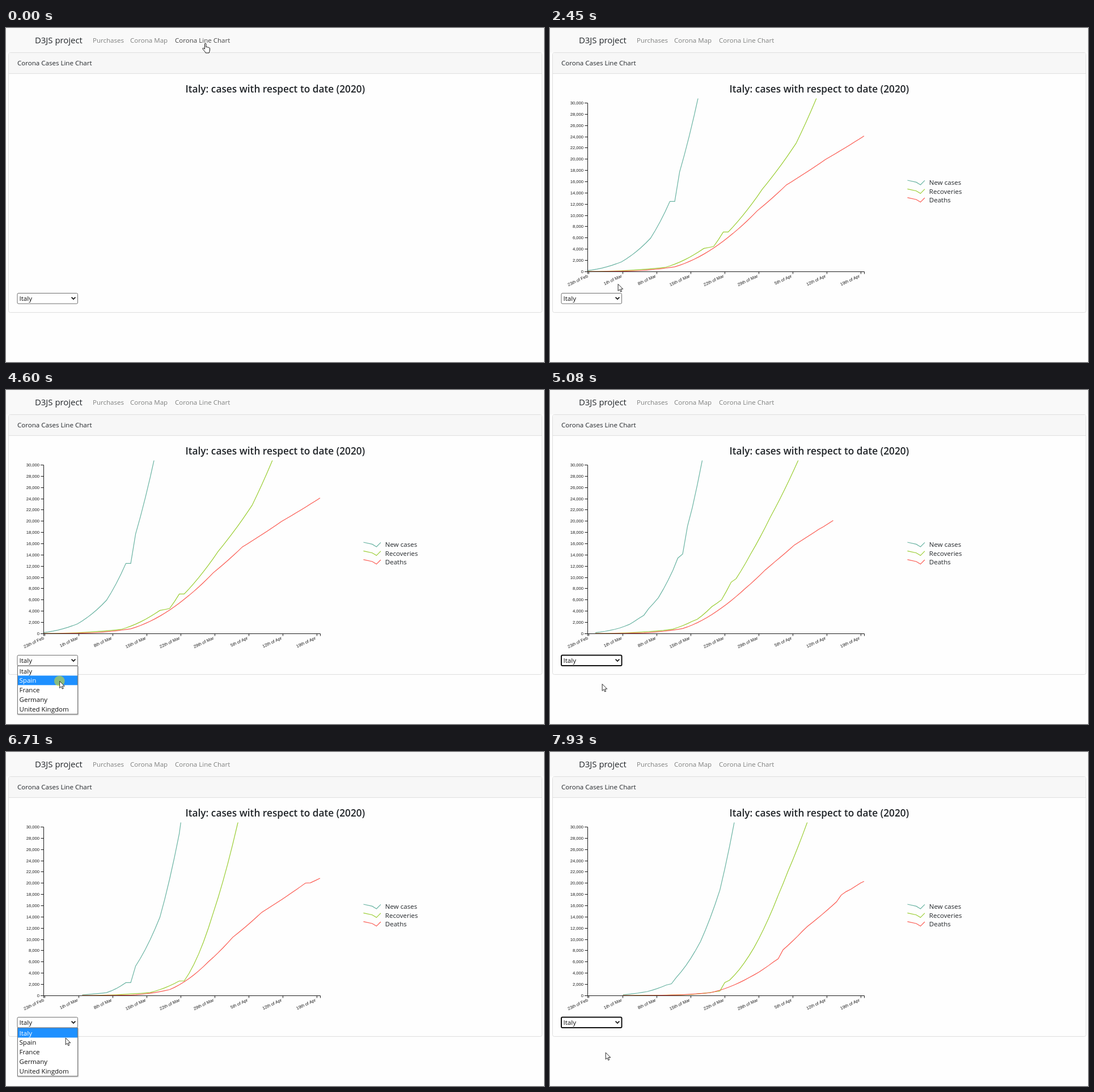
An HTML page that plays this animation: 949 px wide and 590 px high, repeating every 8 s.

```html
<!DOCTYPE html>
<html lang="en">
<head>
<meta charset="utf-8">
<title>Corona Cases Line Chart</title>
<style>
  html, body { margin: 0; width: 100%; height: 100%; overflow: hidden; background: #fefefe; }
  svg { display: block; width: 949px; height: 590px; }
  text { font: 11.55px "Open Sans", "Noto Sans", sans-serif; fill: #212529; }
  .brand { font-size: 14.9px; }
  .link { fill: #7f807f; }
  .title { font-size: 17.3px; font-weight: 600; text-anchor: middle; }
  .tick { font: 7.64px "Liberation Sans", Arial, sans-serif; text-anchor: end; fill: #1c1c1c; }
  .axis { fill: none; stroke: #1c1c1c; }
  .line { fill: none; stroke-width: 1.2; }
  .option { fill: #111; }
</style>
</head>
<body>
<svg viewBox="0 0 949 590">
  <defs>
    <clipPath id="plot"><rect x="60" y="124.4" width="494.6" height="320"/></clipPath>
    <filter id="shadow" x="-10%" y="-10%" width="125%" height="125%">
      <feDropShadow dx=".5" dy="1" stdDeviation="1.1" flood-opacity=".35"/>
    </filter>
  </defs>

  <rect width="949" height="43" fill="#f9f9f9"/>
  <rect x="4.5" y="43.5" width="941" height="459" rx="3" fill="#fefefe" stroke="#dfdfdf"/>
  <path d="M5 80V46q0-2 2-2H943q2 0 2 2V80Z" fill="#f7f7f7"/>
  <path d="M5 80.5H945" stroke="#dfdfdf"/>
  <text class="brand" x="51" y="27.3">D3JS project</text>
  <text class="link" x="153" y="26">Purchases</text>
  <text class="link" x="219" y="26">Corona Map</text>
  <text class="link" id="active" x="298" y="26">Corona Line Chart</text>
  <text x="20" y="66.3">Corona Cases Line Chart</text>
  <text class="title" x="474.8" y="114">Italy: cases with respect to date (2020)</text>

  <g id="chart">
    <g id="lines" clip-path="url(#plot)"></g>
    <g id="axes"></g>
    <g id="legend"></g>
  </g>

  <rect id="select" x="20" y="468.5" width="106.5" height="18.5" rx="2" fill="#fff"/>
  <text class="option" x="23.5" y="482.3">Italy</text>
  <path d="M115.6 475.6l3.4 3.4 3.4-3.4" fill="none" stroke="#111" stroke-width="1.7"/>
  <g id="menu">
    <rect x="20.5" y="487.5" width="106" height="85" fill="#fff" stroke="#767676" filter="url(#shadow)"/>
    <rect id="highlight" x="21" width="105" height="16.8" fill="#1e90ff"/>
  </g>

  <circle id="click" r="9.3" fill="#f6ea00" fill-opacity=".5"/>
  <path id="hand" transform="translate(346.5 27)" fill="#fff" stroke="#111" stroke-linejoin="round"
    d="M4 1.2c0-1.6 2.4-1.6 2.4 0V7c.3-1 2.2-.9 2.4.3 .5-.8 2-.6 2.2.6 .6-.6 2-.2 2 1.1V12c0 2-1.2 3-1.4 5H5.6C5 14.6 2 12.5.6 10c-.7-1.5 1-2.2 2-1.1L4 10.3Z"/>
  <path id="arrow" fill="#fff" stroke="#111" stroke-width=".9" stroke-linejoin="round"
    d="M.4.4V12.4L3.2 9.8 5 14 6.9 13.2 5.1 9.1H9Z"/>
</svg>

<script>
const LOOP = 8000;
const LAST_DAY = 57;
const DAY = 8.563;
const COLORS = ['#69b3a2', '#9acd32', '#fb5b52'];
const $ = id => document.getElementById(id);
const clamp = (v, lo, hi) => Math.min(hi, Math.max(lo, v));
const mix = (a, b, k) => a + (b - a) * k;
const scaleX = day => 65.9 + day * DAY;
const scaleY = thousands => 430.1 - thousands * 9.93;

function add(parent, tag, attrs, text) {
  const el = document.createElementNS('http://www.w3.org/2000/svg', tag);
  for (const name in attrs) el.setAttribute(name, attrs[name]);
  if (text) el.textContent = text;
  return parent.appendChild(el);
}

// Quadratic growth between key points [day, thousands]; the last trend goes on.
function growth(keys, day) {
  let i = keys.findIndex(key => key[0] > day);
  if (i < 0) i = keys.length - 1;
  const [d0, v0] = keys[i - 1], [d1, v1] = keys[i];
  return mix(Math.sqrt(v0), Math.sqrt(v1), (day - d0) / (d1 - d0)) ** 2;
}

// One value a day for cases, recoveries and deaths.
const country = (firstDay, ...curves) => ({
  firstDay,
  series: curves.map(keys =>
    Array.from({ length: LAST_DAY + 1 - firstDay }, (_, day) => growth(keys, day)))
});

const italy = country(0,
  [[0, .15], [7, 1.7], [13, 5.9], [17, 12.46], [18, 12.46], [19, 17.7], [24, 35.7]],
  [[0, 0], [16, .72], [24, 4.1], [26, 4.44], [28, 7.02], [29, 7.02], [36, 14.6], [43, 22.8], [48, 32.5]],
  [[0, 0], [10, .11], [18, .83], [29, 6.08], [35, 10.8], [41, 15.4], [49, 19.9], [57, 24.1]]);

const spain = country(8,
  [[0, .12], [5, .5], [9, 2.28], [10, 2.28], [11, 5.23], [16, 13.9], [20, 28.8], [24, 57.8]],
  [[0, 0], [14, .53], [20, 2.58], [21, 2.58], [27, 14.7], [32, 30.5], [39, 55.7]],
  [[0, 0], [10, .06], [18, 1.04], [26, 6], [31, 10.35], [37, 14.8], [46, 20], [47, 20.04], [49, 20.85]]);

const france = country(7,
  [[0, .13], [11, 2.28], [20, 14.3], [26, 33]],
  [[0, .01], [20, .01], [21, 2.2], [22, 2.2], [27, 5.7], [34, 15.4], [39, 23.2], [45, 31]],
  [[0, 0], [18, .24], [28, 2.6], [32, 4.5], [33, 6.5], [38, 10.9], [44, 15.7], [45, 17.2], [50, 20.3]]);

const TO_SPAIN = 4710, TO_FRANCE = 7357;

// Mouse moves: start, end, x and y of the tip on arrival.
const MOVES = [
  [640, 1010, 205, 261.5], [1409, 1410, 202.5, 261.5], [1860, 2590, 111, 472],
  [3379, 3380, 109, 485], [3380, 3790, 94.3, 514], [4780, 5000, 91.7, 519],
  [5600, 6110, 104.5, 484], [6600, 6710, 104.8, 504.7], [6710, 6920, 97.8, 530.5]
];
const CLICKS = [[2920, 2980], [4600, 4740], [6370, 6440], [7250, 7370]];
const MENUS = [[2980, 4740], [6440, 7370]];
const within = (ranges, t) => ranges.some(([a, b]) => t >= a && t < b);

const mouseAt = t => MOVES.reduce(([x, y], [start, end, toX, toY]) => {
  const p = clamp((t - start) / (end - start), 0, 1), k = p * p * (3 - 2 * p);
  return [mix(x, toX, k), mix(y, toY, k)];
}, [351, 27]);

// Points are matched by index; a point without a partner stands at its end place.
function linePath(from, to, n, k) {
  const a = from.series[n];
  return 'M' + to.series[n].map((value, i) => {
    const paired = i < a.length;
    const day = i + mix(paired ? from.firstDay : to.firstDay, to.firstDay, k);
    const y = mix(paired ? a[i] : value, value, k);
    return scaleX(day).toFixed(2) + ',' + scaleY(y).toFixed(2);
  }).join('L');
}

function buildChart() {
  const axes = $('axes');
  add(axes, 'path', { class: 'axis', d: 'M61 132.5H66.5V430.5H61M66.5 434.5V430.5H554.5V434.5' });
  for (let thousands = 0; thousands <= 30; thousands += 2) {
    const y = scaleY(thousands) + .3;
    add(axes, 'path', { class: 'axis', d: `M61.5 ${Math.floor(y) + .5}H66` });
    add(axes, 'text', { class: 'tick', x: 59, y: y + 2.5 }, thousands ? thousands + ',000' : '0');
  }
  ['23th of Feb', '1th of Mar', '8th of Mar', '15th of Mar', '22th of Mar', '29th of Mar',
    '5th of Apr', '12th of Apr', '19th of Apr'].forEach((label, i) => {
    const x = 68.8 + i * 7 * DAY;
    add(axes, 'path', { class: 'axis', d: `M${Math.floor(x) + .5} 430V434.5` });
    add(axes, 'text', { class: 'tick', transform: `translate(${x - 1.3} 440) rotate(-25)` }, label);
  });
  ['New cases', 'Recoveries', 'Deaths'].forEach((label, i) => {
    const g = add($('legend'), 'g', { transform: `translate(630 ${269 + i * 15.3})` });
    add(g, 'path', { class: 'line', stroke: COLORS[i], d: 'M.5 0L16 3.4 23.5 8 31 .4' });
    add(g, 'text', { x: 38.8, y: 8.2 }, label);
  });
}

buildChart();
const lines = COLORS.map(stroke => add($('lines'), 'path', { class: 'line', stroke }));
const options = ['Italy', 'Spain', 'France', 'Germany', 'United Kingdom'].map((name, i) =>
  add($('menu'), 'text', { class: 'option', x: 23.5, y: 500.5 + i * 16.8 }, name));

const show = (id, on) => { $(id).style.display = on ? '' : 'none'; };

function renderLines(t) {
  const [from, to, start] =
    t < TO_SPAIN ? [italy, italy, 0] :
    t < TO_FRANCE ? [italy, spain, TO_SPAIN] : [spain, france, TO_FRANCE];
  const p = clamp((t - start) / 1000, 0, 1);
  const k = p < .5 ? 4 * p ** 3 : 1 - 4 * (1 - p) ** 3;
  lines.forEach((line, n) => line.setAttribute('d', linePath(from, to, n, k)));
}

function render(t) {
  const [x, y] = mouseAt(t);
  const hovering = t < 660;
  show('hand', hovering);
  show('arrow', !hovering);
  $('arrow').setAttribute('transform', `translate(${x} ${y})`);
  $('active').style.fill = hovering ? '#444' : '';

  show('click', within(CLICKS, t));
  $('click').setAttribute('cx', x);
  $('click').setAttribute('cy', y);

  show('chart', t >= 60);
  renderLines(t);

  // The highlighted row follows the mouse a moment late.
  const open = within(MENUS, t);
  show('menu', open);
  const row = clamp(Math.floor((mouseAt(t - 70)[1] - 487.5) / 16.8), 0, 4);
  $('highlight').setAttribute('y', 487.7 + row * 16.8);
  options.forEach((option, i) => { option.style.fill = i === row ? '#fff' : ''; });

  const focused = !open && t >= MENUS[0][1];
  const over = x < 127 && y > 468 && y < 488;
  $('select').setAttribute('stroke', focused ? '#101010' : over ? '#4f4f4f' : '#707070');
  $('select').setAttribute('stroke-width', focused ? 2 : 1);
}

const begin = performance.now();
function tick() {
  render((performance.now() - begin) % LOOP);
  requestAnimationFrame(tick);
}
tick();
</script>
</body>
</html>
```
